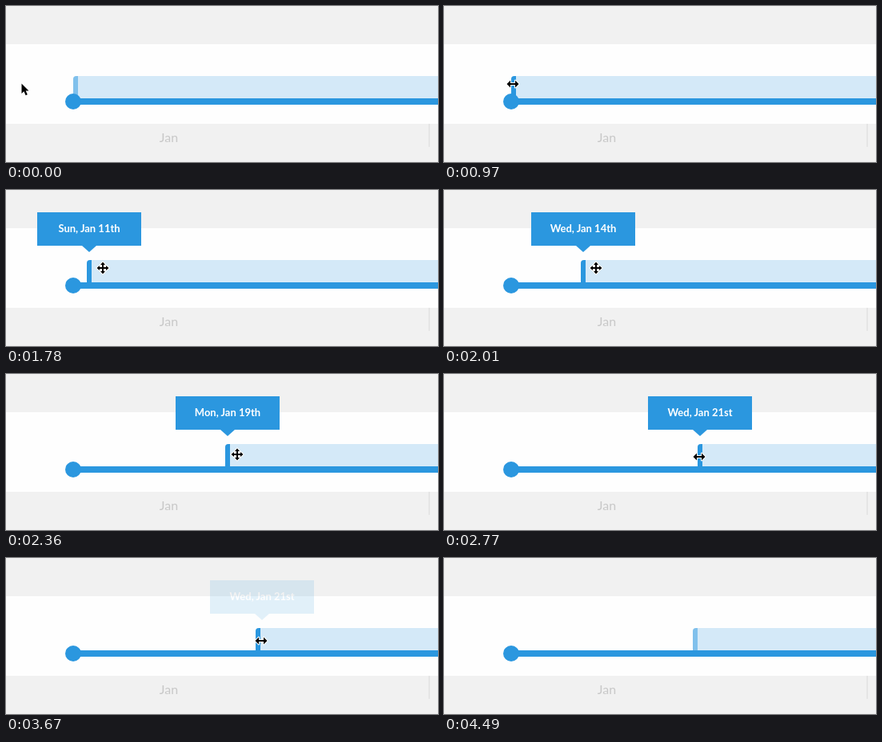
Write an HTML page that moves like this. It is 540 px wide and 196 px high and loops after 4760 ms.

```html
<!DOCTYPE html>
<html lang="en">
<head>
<meta charset="utf-8">
<title>Date range slider</title>
<style>
html, body { margin: 0; width: 100%; height: 100%; overflow: hidden; background: #f1f1f1; }
svg { display: block; width: 540px; height: 196px; }
text { font-family: Lato, "Open Sans", sans-serif; text-anchor: middle; }
.icon { fill: #000; stroke: #fff; stroke-width: 2; paint-order: stroke; stroke-linejoin: round; }
</style>
</head>
<body>
<svg viewBox="0 0 540 196">
  <rect width="540" height="196" fill="#f1f1f1"/>
  <rect y="48" width="540" height="100" fill="#fefefe"/>
  <rect x="528" y="148" width="2" height="29" fill="#e5e5e5"/>
  <text x="203.5" y="171" font-size="16" fill="#c8c8c8">Jan</text>
  <g id="range">
    <path d="M0 116V92a4 4 0 0 1 4-4H540V116Z" fill="#d4e9f8"/>
    <path id="grip" d="M0 116V92a4 4 0 0 1 4-4H6V116Z" fill="#2b97df"/>
  </g>
  <rect x="84" y="116" width="456" height="8" fill="#2b97df"/>
  <circle cx="84" cy="120" r="10" fill="#2b97df"/>
  <g id="tip">
    <path d="M-65 28H65V70H9L0 78L-9 70H-65Z" fill="#2b97df"/>
    <text id="date" y="53" font-size="13" font-weight="700" fill="#fff"></text>
  </g>
  <g id="cursor">
    <path id="arrow" class="icon" d="M.5 .5V13L3.4 10.3L5.6 15.2L7.8 14.2L5.7 9.5H9.5Z"/>
    <path id="resize" class="icon" d="M-7.5 0L-3-4.5V-1H3V-4.5L7.5 0L3 4.5V1H-3V4.5Z"/>
    <path id="move" class="icon" d="M0-7.5L3-4H1V-1H4V-3L7.5 0L4 3V1H1V4H3L0 7.5L-3 4H-1V1H-4V3L-7.5 0L-4-3V-1H-1V-4H-3Z"/>
  </g>
</svg>
<script>
const LOOP = 4760, START = 84, DAY = 20.64, SNAPPED = 311;
const DAYS = ["Sun", "Mon", "Tue", "Wed", "Thu", "Fri", "Sat"];
const $ = id => document.getElementById(id);
const clamp = p => Math.min(1, Math.max(0, p));
const mix = (a, b, p) => a + (b - a) * p;
const ramp = (t, a, b) => clamp((t - a) / (b - a));
const swing = p => 0.5 - Math.cos(p * Math.PI) / 2;

// Bursts of screen updates: first time, last time, count
const BURSTS = [
  [350, 850, 10], [970, 1260, 6], [1420, 1420, 1], [1780, 2300, 10],
  [2360, 2770, 8], [3490, 3790, 6], [4200, 4490, 5]
];

// Time of the latest screen update
function held(t) {
  let last = 0;
  for (const [from, to, count] of BURSTS) {
    if (t < from) break;
    const gap = (to - from) / (count - 1) || 1;
    last = from + gap * Math.min(count - 1, Math.floor((t - from) / gap + 0.05));
  }
  return last;
}

// Left edge of the dragged grip: steady pull, then slowing down
function dragX(t) {
  if (t < 2300) return mix(START, 257, ramp(t, 1722, 2300));
  return mix(257, 317, 1 - Math.pow(1 - ramp(t, 2300, 2740), 2.2));
}

function pointer(t, x) {
  if (t < 900) {
    const p = swing(ramp(t, 300, 850));
    const px = mix(19, 86, p);
    return { x: px, y: mix(97, 98, p), icon: px < START ? "arrow" : "resize" };
  }
  if (t < 4150) {
    const px = dragX(t + 58) + 2;
    return { x: px, y: mix(98, 104, ramp(t, 2011, 2700)), icon: px - x > 9 ? "move" : "resize" };
  }
  if (t > 4450) return { x: 0, y: 0, icon: "" };
  const p = Math.pow(ramp(t, 4140, 4417), 1.3);
  const y = mix(104, 167, p);
  return { x: mix(319, 436, p), y, icon: y < 116 ? "move" : "arrow" };
}

function label(x) {
  const d = 10 + Math.round((x - START) / DAY);
  const end = d === 21 ? "st" : "th";
  return `${DAYS[(d + 3) % 7]}, Jan ${d}${end}`;
}

function place(id, x, y = 0) {
  $(id).setAttribute("transform", `translate(${Math.round(x)} ${Math.round(y)})`);
}

function draw(time) {
  const t = held(time);
  const x = dragX(t);
  place("range", mix(x, SNAPPED, t < 3000 ? 0 : swing(ramp(t, 3440, 3740))));
  const hover = ramp(t, 700, 850) - ramp(t, 4150, 4450);
  $("grip").setAttribute("opacity", mix(0.5, 1, hover));

  place("tip", x + 3);
  $("tip").setAttribute("opacity", swing(ramp(t, 985, 1270)) - swing(ramp(t, 3440, 3740)));
  $("date").textContent = label(x);

  const c = pointer(t, x);
  place("cursor", c.x, c.y);
  for (const id of ["arrow", "resize", "move"]) {
    $(id).style.display = id === c.icon ? "" : "none";
  }
}

const began = performance.now();
function tick() {
  draw((performance.now() - began) % LOOP);
  requestAnimationFrame(tick);
}
tick();
</script>
</body>
</html>
```
